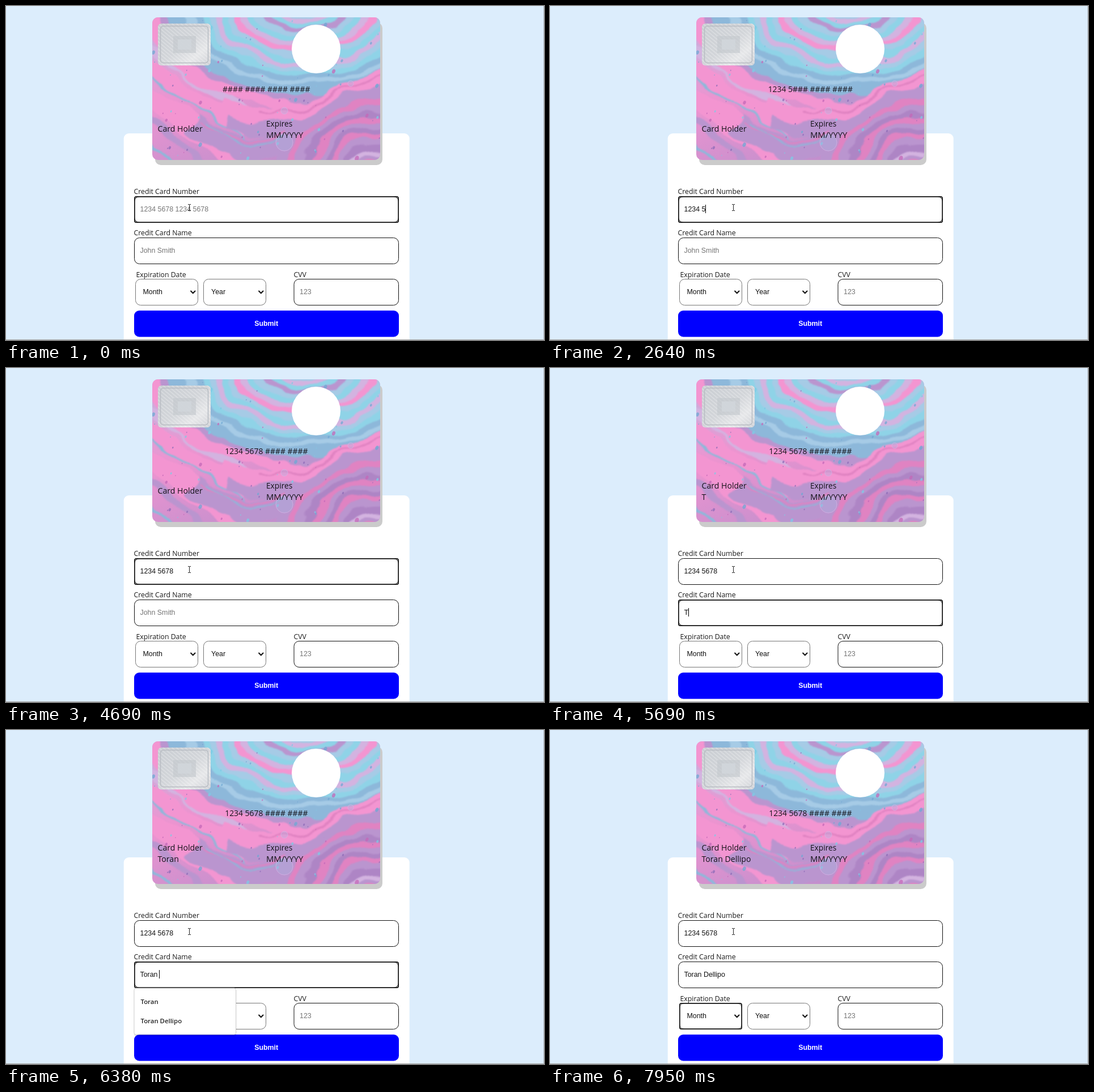
Write an HTML page that moves like this. It is 949 px wide and 590 px high and loops after 8 s.

```html
<!DOCTYPE html>
<html lang="en">
<head>
<meta charset="utf-8">
<title>Card form</title>
<style>
  html, body { margin: 0; width: 100%; height: 100%; overflow: hidden; background: #dcedfc; }
  svg { display: block; width: 949px; height: 590px; }
  text { white-space: pre; }
  .card { font: 14.1px "Open Sans", sans-serif; fill: #15131a; }
  .label { font: 12.3px "Open Sans", sans-serif; fill: #1a1a1a; }
  .field { font: 12.4px "Liberation Sans", Arial, sans-serif; fill: #111; }
  .hint { fill: #757575; }
  .option { font: 600 11.4px "Open Sans", sans-serif; fill: #222; }
  .submit { font: bold 12.4px "Liberation Sans", Arial, sans-serif; fill: #fff; text-anchor: middle; }
  .box { fill: #fff; stroke: #111; }
  .select { stroke: #777; }
  .focus { fill: none; stroke: #101010; stroke-width: 1.7; }
  .arrow { fill: none; stroke: #111; stroke-width: 2; }
  #cardNumber { font-size: 13.9px; text-anchor: middle; }
</style>
</head>
<body>
<svg viewBox="0 0 949 590" xmlns="http://www.w3.org/2000/svg">
  <defs>
    <clipPath id="cardClip"><rect x="258" y="20" width="402" height="252" rx="10"/></clipPath>
    <linearGradient id="base" x1="0" y1="0" x2=".6" y2="1">
      <stop offset="0" stop-color="#c4b4e0"/>
      <stop offset=".45" stop-color="#ec94d0"/>
      <stop offset="1" stop-color="#c18fcd"/>
    </linearGradient>
    <linearGradient id="silver" x1="0" y1="0" x2="1" y2="1">
      <stop offset="0" stop-color="#c9cdd2"/>
      <stop offset=".5" stop-color="#d2d5d9"/>
      <stop offset=".75" stop-color="#e6e7e9"/>
      <stop offset="1" stop-color="#cfd1d6"/>
    </linearGradient>
    <pattern id="hatch" width="5" height="5" patternUnits="userSpaceOnUse" patternTransform="rotate(40)">
      <rect width="5" height="1.2" fill="#fff" opacity=".35"/>
    </pattern>
    <filter id="swirl" filterUnits="userSpaceOnUse" x="200" y="-40" width="520" height="370" color-interpolation-filters="sRGB">
      <feTurbulence type="fractalNoise" baseFrequency=".012 .016" numOctaves="3" seed="8"/>
      <feDisplacementMap in="SourceGraphic" scale="36" xChannelSelector="R" yChannelSelector="G"/>
      <feGaussianBlur stdDeviation=".9"/>
    </filter>
  </defs>

  <rect width="949" height="590" fill="#dcedfc"/>
  <rect x="207.7" y="225" width="504" height="380" rx="9" fill="#fff"/>

  <!-- card -->
  <rect x="263" y="29" width="401" height="252" rx="10" fill="#cbcbcb"/>
  <g clip-path="url(#cardClip)">
    <rect x="258" y="20" width="402" height="252" fill="url(#base)"/>
    <g id="marble" filter="url(#swirl)"></g>
    <g id="drops"></g>
  </g>
  <rect x="268" y="31" width="93" height="74" rx="6" fill="url(#silver)"/>
  <rect x="268" y="31" width="93" height="74" rx="6" fill="url(#hatch)"/>
  <rect x="272.5" y="35.5" width="84" height="65" rx="5" fill="none" stroke="#b8bcc2" stroke-width="1.5"/>
  <rect x="295" y="53" width="40" height="30" fill="#c3c8ce" opacity=".6"/>
  <rect x="303" y="59" width="24" height="18" fill="#d3d8dc" opacity=".8"/>
  <circle cx="547" cy="76" r="43" fill="#fff"/>
  <g class="card">
    <text id="cardNumber" x="459.3" y="151.5"></text>
    <text id="holder" x="267.5">Card Holder</text>
    <text id="cardName" x="267.5" y="232.5"></text>
    <text x="459" y="212.5" style="font-size:13.7px">Expires</text>
    <text x="459" y="232.5" style="font-size:14.8px">MM/YYYY</text>
  </g>

  <!-- form -->
  <g class="label">
    <text x="225.5" y="332">Credit Card Number</text>
    <text x="225.5" y="405">Credit Card Name</text>
    <text x="229.5" y="478.5">Expiration Date</text>
    <text x="507.5" y="478.5">CVV</text>
  </g>
  <rect class="box" x="226.5" y="336.5" width="466" height="46" rx="9"/>
  <rect class="box" x="226.5" y="409.5" width="466" height="46" rx="9"/>
  <rect class="box select" x="228.5" y="482.5" width="110" height="46" rx="9"/>
  <rect class="box select" x="348.5" y="482.5" width="110" height="46" rx="9"/>
  <rect class="box" x="508" y="482.5" width="184.5" height="46" rx="9"/>
  <path class="arrow" d="M325.5 503l4.3 4.3 4.3-4.3M445.5 503l4.3 4.3 4.3-4.3"/>
  <g class="field">
    <text id="number" x="236.5" y="362.5"></text>
    <text id="name" x="236.5" y="435.7"></text>
    <text x="241.5" y="509">Month</text>
    <text x="362" y="509">Year</text>
    <text class="hint" x="518" y="509">123</text>
  </g>
  <rect x="226" y="538" width="467" height="46.5" rx="9" fill="#00f"/>
  <text class="submit" x="459.2" y="565">Submit</text>
  <rect id="focus" class="focus" height="45.3" rx="3"/>
  <rect id="caret" width="1" height="15" fill="#000"/>

  <!-- suggestions -->
  <g id="menu">
    <rect id="menuShade" x="225.5" y="457" width="181" rx="4" fill="#000" opacity=".1"/>
    <rect id="menuBox" x="226" y="456" width="179.5" rx="3" fill="#fff" stroke="#c8c8c8" stroke-width=".8"/>
    <g class="option">
      <text x="237.5" y="484"></text>
      <text x="237.5" y="517.6"></text>
      <text x="237.5" y="551.2"></text>
    </g>
  </g>

  <path d="M321 350.5h2l.5.5.5-.5h2M323.5 351v10M321 361.5h2l.5-.5.5.5h2" fill="none" stroke="#222"/>
  <rect y="589" width="949" height="1" fill="#a3a3a3"/>
  <rect x="948" width="1" height="590" fill="#b4bcc4"/>
</svg>

<script>
const $ = id => document.getElementById(id);

function add(parent, tag, attrs) {
  const el = document.createElementNS('http://www.w3.org/2000/svg', tag);
  set(el, attrs);
  parent.append(el);
}

function set(el, attrs) {
  for (const key in attrs) el.setAttribute(key, attrs[key]);
}

// Nested ellipses, drawn from the outside in
function rings(cx, cy, rx, ry, colors) {
  colors.forEach((fill, i) => {
    const k = 1 - i / colors.length;
    add($('marble'), 'ellipse', { cx, cy, rx: rx * k, ry: ry * k, fill });
  });
}

function stream(d, stroke, width) {
  add($('marble'), 'path', { d, stroke, 'stroke-width': width, fill: 'none' });
}

function paintMarble() {
  const pink = '#f395d1', rose = '#e083c2', cyan = '#8fd3e7', sky = '#a6cbe6',
        blue = '#8db8da', lilac = '#ba95cf', violet = '#ae85c5', pale = '#d3b3e0';
  stream('M230 70C300 90 340 140 440 200', pale, 18);
  stream('M230 100C290 115 330 165 420 220', pink, 24);
  stream('M230 112C290 130 340 190 420 235', blue, 3);
  stream('M230 150C300 170 350 230 420 290', pink, 40);
  stream('M250 200C300 215 320 250 350 300', lilac, 14);
  stream('M230 235C260 245 290 270 300 300', blue, 6);
  rings(525, -5, 280, 190, [pink, pink, lilac, blue, blue, sky, blue, cyan, sky, pale, cyan, sky,
    pink, pale, cyan, sky, lilac, cyan, pale, sky, pink, cyan]);
  stream('M380 180C440 215 520 200 690 110', pink, 26);
  stream('M390 205C460 235 540 215 690 140', lilac, 26);
  stream('M330 205C400 270 450 265 540 215', lilac, 36);
  stream('M340 200C390 250 440 250 520 215', rose, 2.5);
  stream('M350 204C395 256 440 256 510 224', blue, 2);
  stream('M450 192C530 187 590 148 690 112', rose, 3);
  rings(655, 300, 185, 150, [lilac, lilac, rose, lilac, violet, rose, lilac, violet, rose, lilac,
    violet, pale, lilac, rose, violet, lilac]);
}

function paintDrops() {
  let seed = 17;
  const rnd = () => (seed = seed * 16807 % 2147483647) / 2147483647;
  const tints = ['#6fa8d4', '#c568b8', '#7ecbe6', '#8f6cb8'];
  for (let i = 0; i < 90; i++) {
    const cx = 260 + rnd() * 400, cy = 24 + rnd() * 246, r = .7 + rnd() * rnd() * 3;
    add($('drops'), 'ellipse', { cx, cy, rx: r, ry: r * 1.4, fill: tints[i % 4], opacity: .75,
      transform: `rotate(25 ${cx} ${cy})` });
  }
  for (const [cx, cy, r] of [[491, 185, 6], [491, 241, 15], [608, 137, 5]])
    add($('drops'), 'circle', { cx, cy, r, fill: '#a8b4e0', 'fill-opacity': .35, stroke: '#d7b4e6', 'stroke-opacity': .7 });
}

const LOOP = 8000;
const FIRST = 'Toran', FULL = 'Toran Dellipo';

const track = {
  number: [[0, ''], [680, '12'], [970, '123'], [1270, '1234 '], [2640, '1234 5'],
    [2810, '1234 56'], [4140, '1234 5678 ']],
  // letters of the name typed so far
  name: [[0, 0], [5690, 1], [5840, 2], [5970, 3], [6100, 4], [6240, 6], [6660, 7],
    [6800, 8], [6930, 9], [7530, 11], [7660, 12], [7810, 13]],
  focus: [[0, 'number'], [5110, 'name'], [7950, 'month']],
  caret: [[0, 0], [280, 1], [1720, 0], [2330, 1], [3290, 0], [3860, 1], [4690, 0],
    [5110, 1], [7380, 0], [7530, 1], [7950, 0]],
  rows: [[0, 0], [5840, 3], [6240, 2], [6660, 1], [7810, 0]]
};
const rings2d = { number: [226.85, 336.85, 465.3], name: [226.85, 409.85, 465.3], month: [228.85, 482.85, 109.3] };

function at(key, t) {
  let value;
  for (const [time, v] of track[key]) if (time <= t) value = v;
  return value;
}

const pen = document.createElement('canvas').getContext('2d');
pen.font = '12.4px "Liberation Sans", Arial, sans-serif';

function fill(id, value, hint) {
  $(id).textContent = value || hint;
  $(id).classList.toggle('hint', !value);
}

function draw(t) {
  const number = at('number', t), name = FULL.slice(0, at('name', t));
  const focus = at('focus', t), rows = at('rows', t);

  fill('number', number, '1234 5678 1234 5678');
  fill('name', name, 'John Smith');
  $('cardNumber').textContent = number + '#### #### #### ####'.slice(number.length);
  $('cardName').textContent = name;
  $('holder').setAttribute('y', name ? 212.5 : 222);

  const [x, y, width] = rings2d[focus];
  set($('focus'), { x, y, width });
  const text = focus === 'number' ? number : name;
  set($('caret'), {
    x: Math.floor(236.5 + pen.measureText(text).width),
    y: focus === 'number' ? 351 : 424,
    opacity: at('caret', t)
  });

  $('menu').style.display = rows ? '' : 'none';
  const height = 15 + 33.5 * rows;
  set($('menuBox'), { height });
  set($('menuShade'), { height: height + 1.5 });
  document.querySelectorAll('.option text').forEach((el, i) => {
    el.textContent = i >= rows ? '' : i === rows - 1 ? FULL : FIRST;
  });
}

paintMarble();
paintDrops();
const start = performance.now();
function tick() {
  draw((performance.now() - start) % LOOP);
  requestAnimationFrame(tick);
}
tick();
</script>
</body>
</html>
```
